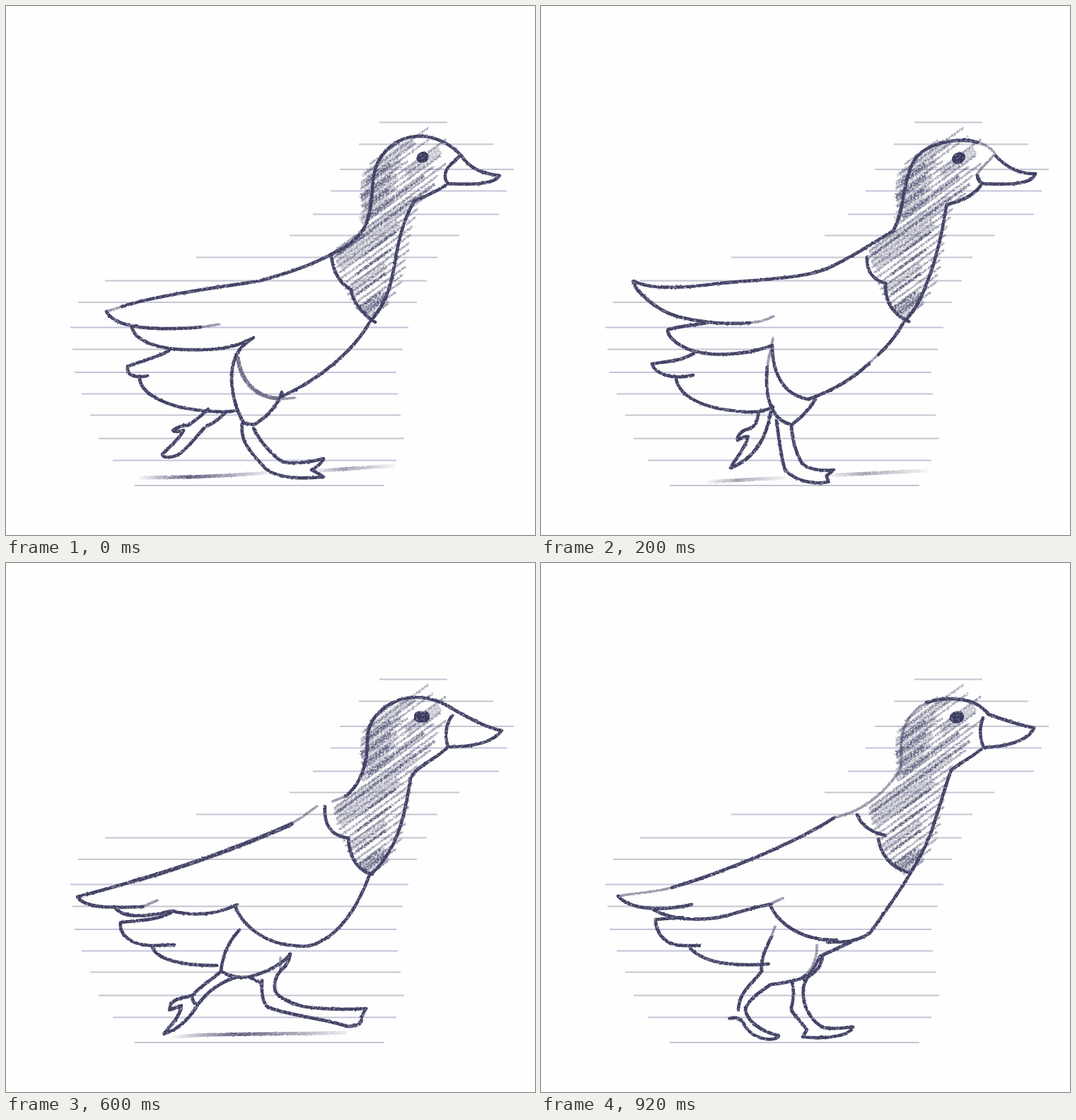
An HTML page without scripts that plays this animation: 748 px wide and 748 px high, repeating every 1000 ms.

```html
<!DOCTYPE html>
<html lang="en">
<head>
<meta charset="utf-8">
<title>Walking duck sketch</title>
<style>
html, body { margin: 0; width: 100%; height: 100%; overflow: hidden; background: #fefefe; }
svg { display: block; width: 100%; height: 100%; }
path { fill: none; stroke-linecap: round; stroke-linejoin: round; }
.rules { stroke: #c6c5d1; stroke-width: 2; stroke-linecap: butt; }
.rules.blue { stroke: #c5c3da; }
.pose, .hatch { stroke: #404064; }
.pose { stroke-width: 4.7; filter: url(#pencil); visibility: hidden; animation: show 1s step-end infinite; animation-delay: calc(var(--i) * .2s - 1s); }
.soft { stroke-width: 3.6; opacity: .55; }
.bold { stroke-width: 5.8; }
.ground { stroke: url(#fade); stroke-width: 5; }
.eye { fill: #38385c; stroke: none; }
.hatch { filter: url(#grain); }
.hatch path { stroke-linecap: butt; }
.smudge { stroke-width: 13; opacity: .3; }
.fine { stroke-width: 3; opacity: .5; }
.dark { stroke-width: 4; opacity: .75; }
@keyframes show {
  0% { visibility: visible; }
  20%, 100% { visibility: hidden; }
}
</style>
</head>
<body>
<svg viewBox="0 0 748 748">
<defs>
  <filter id="pencil" filterUnits="userSpaceOnUse" x="0" y="0" width="748" height="748" color-interpolation-filters="sRGB">
    <feTurbulence type="fractalNoise" baseFrequency=".3" numOctaves="2" seed="4" result="n"/>
    <feDisplacementMap in="SourceGraphic" in2="n" scale="2.5" xChannelSelector="R" yChannelSelector="G" result="d"/>
    <feColorMatrix in="n" values="0 0 0 0 0  0 0 0 0 0  0 0 0 0 0  0 0 0 1.5 .25" result="a"/>
    <feComposite in="d" in2="a" operator="in"/>
  </filter>
  <filter id="grain" filterUnits="userSpaceOnUse" x="0" y="0" width="748" height="748" color-interpolation-filters="sRGB">
    <feTurbulence type="fractalNoise" baseFrequency=".4" numOctaves="2" seed="9" result="n"/>
    <feDisplacementMap in="SourceGraphic" in2="n" scale="3.5" xChannelSelector="R" yChannelSelector="G" result="d"/>
    <feColorMatrix in="n" values="0 0 0 0 0  0 0 0 0 0  0 0 0 0 0  0 0 0 2.4 -.4" result="a"/>
    <feComposite in="d" in2="a" operator="in"/>
  </filter>
  <linearGradient id="fade">
    <stop stop-color="#404064" stop-opacity="0"/>
    <stop offset=".4" stop-color="#404064" stop-opacity=".85"/>
    <stop offset="1" stop-color="#404064" stop-opacity=".1"/>
  </linearGradient>
</defs>

<path class="rules" d="M528 164.500H624M499 195.500H689M472 231H718M401 324.500H641M269 355.500H610M140 388.500H595M102 419H581M94 485.500H561M119 578.500H558M131 611.500H563M182 678H535"/>
<path class="rules blue" d="M459 261.500H708M434 294.500H697M91 454.500H569M97 518H552M107 548.500H554M151 642.500H552"/>

<g class="hatch">
  <g transform="translate(545 310) rotate(-36)">
    <path class="smudge" d="M12-78H95M-2-66H64M-14-54H46M-18-42H36M-32-30H20M60-46H118M-88-12H50M-94 4H10M-104 40H-40M-106 72H-62M-104 82H-66"/>
    <path class="fine" d="M26-88H84M8-81H124M0-74H96M-6-67H122M-10-60H72M-14-53H134M-19-46H84M-24-39H114M-28-32H98M-32-25H114M-88-18H94M-94-4H72M-98 3H44M-100 11H34M-102 19H24M-105 27H14M-106 35H6M-108 43H0M-109 51H-12M-109 59H-18M-110 66H-28M-108 73H-34M-104 80H-50M-98 87H-70"/>
    <path class="dark" d="M4-70H50M-12-57H40M-16-43H28M-20-29H78M-92-11H84M-60 11H0M-82 27H-20M-98 50H-46M-106 68H-68M-104 77H-68"/>
  </g>
</g>

<g class="pose" style="--i:0">
  <path d="M460 351C484 340 503 326 510 306C518 284 517 262 520 240C526 207 552 185 584 184C610 184 632 198 644 212C657 232 677 237 698 240C690 253 655 253 625 251M643 211C632 221 620 230 621 241Q621 247 625 251C611 262 590 270 577 276C555 315 553 350 546 383C540 412 528 432 515 446C490 490 440 530 388 553"/>
  <path d="M460 351C430 368 395 378 358 389C290 399 210 410 164 425M142 432C150 447 175 455 215 456Q250 457 275 454M460 351C462 378 474 394 488 401C490 417 502 435 522 447"/>
  <path class="soft" d="M142 432L164 425M275 454L302 450M386 556L408 554"/>
  <path d="M178 455C185 475 215 485 255 486C290 487 320 486 350 469C330 480 318 500 319 530C321 560 330 580 337 590L351 592C370 580 384 566 390 546M231 487C215 497 190 502 172 510C170 521 180 527 200 523M189 528C193 550 230 570 290 573Q312 575 325 572"/>
  <path class="bold" opacity=".75" d="M328 498C332 530 352 553 386 555"/>
  <path d="M286 570C280 577 264 588 258 593C250 592 240 597 236 600C238 603 242 602 251 600C247 610 230 625 221 634C222 641 240 638 247 632C260 622 272 605 280 597M284 594Q300 587 311 574"/>
  <path d="M334 590C330 617 348 633 368 655C385 668 415 669 449 666C443 661 436 658 432 656Q446 648 449 640C430 645 410 648 392 645C375 636 356 610 350 597"/>
  <path class="ground" d="M185 667Q280 667 370 660"/>
  <path class="ground" opacity=".6" d="M430 658L548 650"/>
  <ellipse class="eye" cx="589" cy="214" rx="9" ry="7.500" transform="rotate(-30 589 214)"/>
</g>

<g class="pose" style="--i:1">
  <path d="M498 318C516 285 510 245 530 215C548 193 590 185 618 193M643 212C658 228 676 238 699 237C695 250 672 254 625 251C620 249 617 246 617 239M622 254C610 270 590 277 574 281M573 284C566 330 554 375 538 410Q528 432 513 447C500 470 488 483 477 493M464 505C442 527 410 545 378 556"/>
  <path class="soft" d="M618 193Q634 197 642 209C634 220 618 231 617 239M477 493L464 505M295 448Q316 446 328 439M326 480L328 470"/>
  <path d="M498 318C470 335 440 355 405 371C370 386 300 387 245 393C210 398 155 402 131 389C128 397 160 430 193 439C220 446 255 451 295 448M461 355C460 375 470 388 487 392C486 420 500 437 520 446"/>
  <path d="M240 447C215 452 190 453 179 458C180 472 205 490 240 492C270 494 300 490 327 480C327 515 340 550 378 556M216 491C200 502 175 503 157 506C160 517 180 530 215 522M191 528C198 555 230 570 290 574Q312 575 328 567"/>
  <path class="soft" d="M325 487Q322 495 320 512"/>
  <path d="M320 510C317 540 320 560 330 575Q338 588 354 592C365 585 380 570 388 556"/>
  <path d="M308 574C305 590 303 596 290 599C280 603 277 610 278 614Q287 608 293 609C289 625 275 640 268 653C290 645 316 625 325 574M333 586C336 610 340 640 345 656C360 672 385 677 406 673C407 668 402 666 404 664L414 656C395 658 375 655 368 645C360 630 355 610 354 594"/>
  <path class="ground" opacity=".55" d="M232 673L345 667"/>
  <path class="ground" opacity=".55" d="M400 664L545 657"/>
  <ellipse class="eye" cx="590.500" cy="215" rx="10" ry="8" transform="rotate(-30 590.5 215)"/>
</g>

<g class="pose" style="--i:2">
  <path d="M494 318C508 302 511 285 512 262C512 225 545 191 588 191C615 191 636 200 645 213C660 234 680 238 703 238C696 256 660 258 630 253M625 230Q618 244 625 255C612 272 592 281 576 285C567 330 552 385 521 433C495 470 455 505 413 542"/>
  <path class="soft" d="M483 326L494 318M642 210Q634 218 625 231M325 535C322 550 323 565 330 580M240 458Q264 456 280 450M326 474V486"/>
  <path d="M383 381C350 395 290 409 225 414C180 417 140 416 106 419M108 424C130 443 175 457 240 458M453 355C455 378 467 388 485 393C487 415 495 437 513 438L521 433"/>
  <path class="bold" d="M483 326C455 340 420 362 365 387"/>
  <path d="M185 461C190 478 220 492 255 493C285 492 305 486 326 484C330 525 350 550 413 544M415 543C408 562 385 585 357 590M213 493C200 504 170 508 153 507C165 524 195 537 220 536M198 540C210 562 260 578 342 579"/>
  <path d="M341 580C335 592 322 601 305 602C292 607 288 617 285 628Q294 620 307 618M303 618C292 640 294 670 302 675L311 677M357 590C340 596 320 615 313 635Q310 655 313 671"/>
  <path d="M357 592L362 635C358 650 362 665 370 676C395 678 425 677 444 675L436 667L447 655C425 658 390 655 383 648C375 635 373 610 372 589"/>
  <path class="ground" opacity=".8" d="M182 676C230 672 260 672 294 671"/>
  <path d="M320 670L365 668" opacity=".7"/>
  <path class="ground" opacity=".6" d="M430 670L525 660"/>
  <ellipse class="eye" cx="591" cy="219" rx="10" ry="8" transform="rotate(-25 591 219)"/>
</g>

<g class="pose" style="--i:3">
  <path d="M480 330C500 315 512 285 511 250C511 215 545 190 580 190C605 190 622 200 638 210C660 222 680 233 701 237C692 250 668 260 628 260M631 216C622 226 620 245 625 260C612 275 578 288 572 305C566 340 560 385 534 420Q525 433 514 441C497 487 470 530 430 541"/>
  <path class="soft" d="M462 337L480 330M439 344C425 355 415 363 402 369M190 487L214 477M388 558V575"/>
  <path class="bold" d="M404 369C350 394 250 431 180 450"/>
  <path d="M180 450C150 459 120 467 101 472C110 488 150 488 193 486M451 344C449 370 460 386 484 389C485 418 500 437 518 440"/>
  <path d="M153 486C165 502 190 502 235 492C270 501 300 496 327 483M324 485C335 515 370 540 410 541Q420 543 430 541M234 494C215 505 185 506 162 508C160 525 175 540 205 541L238 540M207 543C212 560 250 570 298 569"/>
  <path d="M330 519C315 535 306 555 304 577C315 585 330 587 345 585C370 578 390 568 402 553M345 586L360 594"/>
  <path d="M304 577C295 587 275 598 265 610C260 615 240 613 233 624L231 632L248 626C247 640 232 655 223 666C245 660 262 640 271 625C285 605 305 592 325 586M271 625Q264 622 263 613"/>
  <path d="M362 590C361 605 362 620 370 628C400 640 450 644 482 655C497 656 505 650 502 643L509 630C470 632 440 630 420 627C400 622 380 612 380 602C379 588 384 580 393 572Q400 564 402 553"/>
  <path class="ground" d="M230 672C270 664 380 667 480 664"/>
  <rect class="eye" x="577" y="209.500" width="22" height="16" rx="7"/>
</g>

<g class="pose" style="--i:4">
  <path class="soft" d="M415 360C460 350 490 320 508 292C512 275 505 250 515 230C525 205 545 193 575 192M185 459C160 466 130 467 109 471M331 514L325 530M390 540Q391 565 374 583M320 484L342 474"/>
  <path d="M545 197C580 187 615 191 633 214C655 222 675 229 697 233C690 252 655 260 626 261C620 247 620 232 625 219M622 264C605 277 590 284 580 293C570 320 562 352 550 385C538 415 510 462 465 523C445 537 425 536 405 536"/>
  <path d="M415 360C350 402 240 443 185 459M109 471C125 490 170 493 213 483M447 356C453 372 470 382 487 385M477 390C480 412 495 430 518 437"/>
  <path d="M160 491C190 507 240 507 275 495Q300 487 326 482M325 486C340 515 375 535 418 533M200 501L162 504C162 520 172 540 200 541L224 541M211 545C230 565 270 571 322 567"/>
  <path d="M325 530C318 545 310 560 312 577C302 592 280 605 279 632M374 583Q366 590 358 590C345 594 335 595 325 596C308 607 290 620 289 632C292 650 315 664 336 668C335 677 300 677 287 652M267 644Q278 640 286 650"/>
  <path d="M438 536L395 556C385 575 375 585 371 600C368 630 385 650 400 657C415 660 430 657 441 656C438 668 405 674 370 670L376 660C362 640 350 635 355 625Q359 608 355 592M398 556C397 572 386 580 372 590"/>
  <ellipse class="eye" cx="588" cy="218" rx="10.500" ry="8.500" transform="rotate(-15 588 218)"/>
</g>
</svg>
</body>
</html>
```
